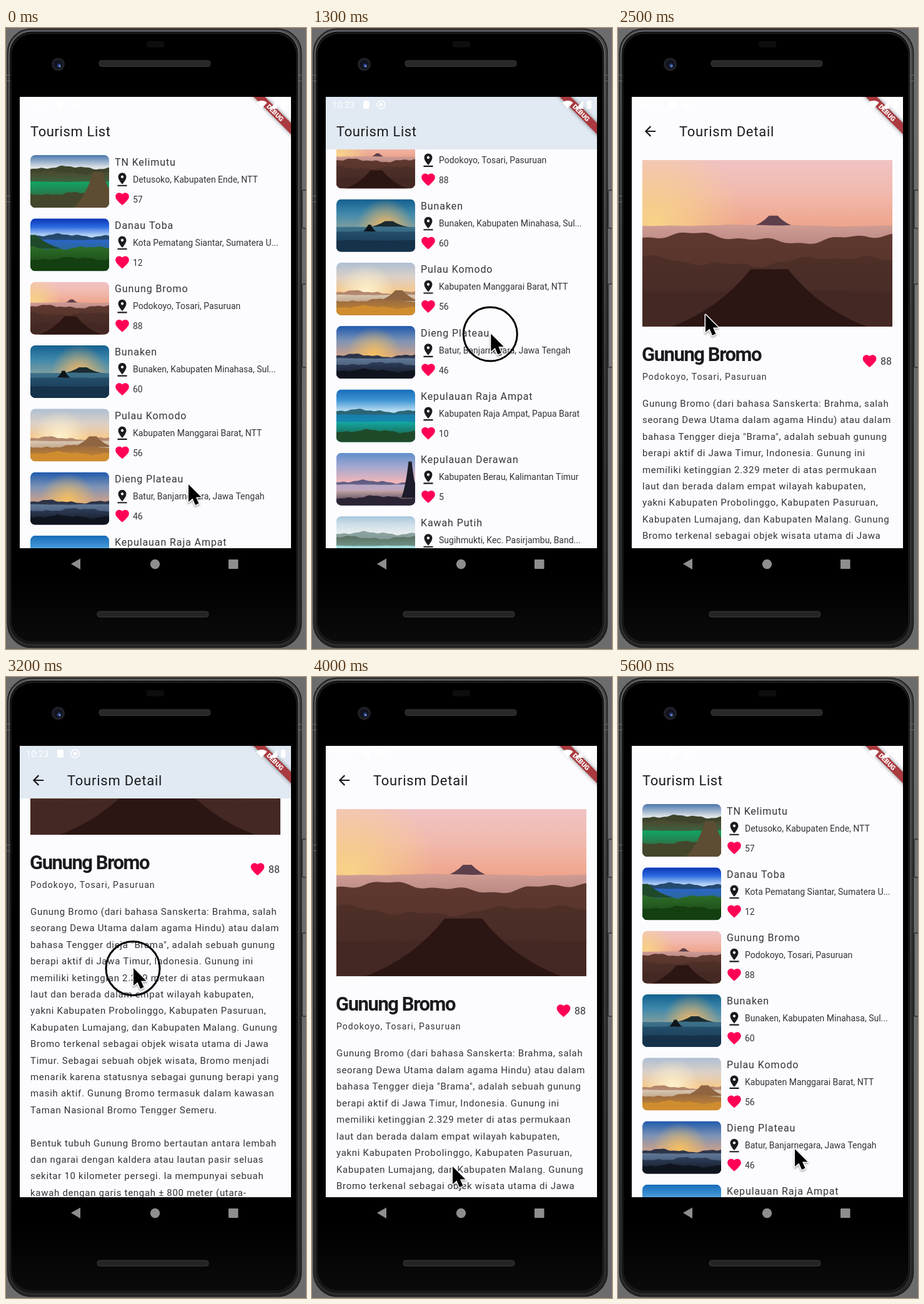
These frames come from a looping animation (480 by 992 pixels, 5.7 s). An HTML page with a canvas:

```html
<!DOCTYPE html>
<html lang="id">
<head>
<meta charset="utf-8">
<title>Tourism List</title>
<style>
html, body { margin: 0; width: 100%; height: 100%; overflow: hidden; background: #6c6c6c; }
canvas { display: block; }
</style>
</head>
<body>
<canvas id="stage" width="480" height="992"></canvas>
<script>
const g = document.getElementById('stage').getContext('2d');
const LOOP = 5700, STEP = 100;
const INK = '#1b1b1f', SOFT = '#333438', PAPER = '#fcfcff', PINK = '#ff0055', TINT = '#e1e9f2';
const SCREEN = [22, 110, 434, 721], HEADER_END = 194, CARD = 101.3, LINE = 26.4;

const HEART = new Path2D('M12 21.35l-1.45-1.32C5.4 15.36 2 12.28 2 8.5 2 5.42 4.42 3 7.5 3c1.74 0 3.41.81 4.5 2.09C13.09 3.81 14.76 3 16.5 3 19.58 3 22 5.42 22 8.5c0 3.78-3.4 6.86-8.55 11.54z');
const PIN = new Path2D('M18 8c0-3.31-2.69-6-6-6S6 4.69 6 8c0 4.5 6 11 6 11s6-6.5 6-11zm-8 0c0-1.1.9-2 2-2s2 .9 2 2-.89 2-2 2c-1.1 0-2-.9-2-2zM5 20v2h14v-2z');
const BACK = new Path2D('M20 11H7.83l5.59-5.59L12 4l-8 8 8 8 1.41-1.41L7.83 13H20z');
const ARROW = new Path2D('M0 0V28L6.5 22.5 11 33 16.5 30.5 12 20.5H20.5Z');

// Land layers run from far to near; "=" marks flat water, sand or cloud.
const places = [
  { name: 'TN Kelimutu', spot: 'Detusoko, Kabupaten Ende, NTT', likes: 57,
    horizon: 20, sky: '#4a76aa #dfe4e8', land: '#3c442b #4b4a30 =#12a566 #43462a',
    peaks: [{ layer: 4, x: 108, half: 40, height: 58, color: '#5d4d33' }] },
  { name: 'Danau Toba', spot: 'Kota Pematang Siantar, Sumatera U...', likes: 12,
    horizon: 27, sky: '#0a35b4 #2c6be0 #b5d3f5', land: '#24486a =#2a66c8 #2c6a28 #143f10',
    peaks: [{ layer: 2, x: 0, half: 50, height: 22, color: '#1f4a2a' }] },
  { name: 'Gunung Bromo', spot: 'Podokoyo, Tosari, Pasuruan', likes: 88,
    horizon: 33, sky: '#f0c3c3 #f1b9ae #efa58c', sun: { x: 6, color: '#f8d488' }, land: '=#cf9c94 #5e382f #4d2f28 =#442823',
    peaks: [{ layer: 0, x: 66, half: 12, height: 6, color: '#5d3f4b' }, { layer: 4, x: 64, half: 52, height: 30, color: '#2c1613' }] },
  { name: 'Bunaken', spot: 'Bunaken, Kabupaten Minahasa, Sul...', likes: 60,
    horizon: 44, sky: '#14608f #3d87ab #7b9da0', sun: { x: 78, color: '#f2b865' }, land: '=#3d718a =#244f6c =#15324a',
    peaks: [{ layer: 0, x: 84, half: 34, height: 10, color: '#1a2b30' }, { layer: 1, x: 53, half: 12, height: 12, color: '#0d141a' }] },
  { name: 'Pulau Komodo', spot: 'Kabupaten Manggarai Barat, NTT', likes: 56,
    horizon: 47, sky: '#aebfd3 #dcd0c6 #f6c98c', sun: { x: 48, color: '#fff3cf' }, land: '#b0846a =#d8c7b3 #9a6b40 #cf8d30',
    peaks: [{ layer: 2, x: 100, half: 32, height: 17, color: '#8e6540' }] },
  { name: 'Dieng Plateau', spot: 'Batur, Banjarnegara, Jawa Tengah', likes: 46,
    horizon: 47, sky: '#1f59ad #7d93b5 #c9a08d', sun: { x: 60, color: '#f6c060' }, land: '#2a3146 =#5f7795 #2c3b56 #10141e' },
  { name: 'Kepulauan Raja Ampat', spot: 'Kabupaten Raja Ampat, Papua Barat', likes: 10,
    horizon: 34, sky: '#166bb8 #3f94d4 #b6dcf0', land: '#2c6474 =#187eae =#12a9a4 #1f4a2a' },
  { name: 'Kepulauan Derawan', spot: 'Kabupaten Berau, Kalimantan Timur', likes: 5,
    horizon: 46, sky: '#5f8ecb #a6a8d0 #efb5b8', land: '#5c5a80 =#b9a7c5 =#c8a8ac #2b2536',
    peaks: [{ layer: 3, x: 118, half: 14, height: 58, color: '#1d1c2a' }] },
  { name: 'Kawah Putih', spot: 'Sugihmukti, Kec. Pasirjambu, Band...', likes: 94,
    horizon: 27, sky: '#a6c6de #cfdfe8 #e7edee', land: '#8ba2a0 #5d7566 =#a5dedb =#a0dad6' },
  { name: 'Pantai Tanjung Tinggi', spot: 'Kecamatan Sijuk, Kabupaten Belitu...', likes: 78,
    horizon: 35, sky: '#2f7fd0 #66aee6 #d3e9f6', land: '#2d6a84 =#1f7c9c =#54b0b0 =#a9c8b8',
    peaks: [{ layer: 2, x: 106, half: 30, height: 22, color: '#6b757d' }] },
  { name: '', spot: '', likes: '', horizon: 34, sky: '#272b30 #45535a', land: '#5d7276' }
];

const story = `Gunung Bromo (dari bahasa Sanskerta: Brahma, salah
seorang Dewa Utama dalam agama Hindu) atau dalam
bahasa Tengger dieja "Brama", adalah sebuah gunung
berapi aktif di Jawa Timur, Indonesia. Gunung ini
memiliki ketinggian 2.329 meter di atas permukaan
laut dan berada dalam empat wilayah kabupaten,
yakni Kabupaten Probolinggo, Kabupaten Pasuruan,
Kabupaten Lumajang, dan Kabupaten Malang. Gunung
Bromo terkenal sebagai objek wisata utama di Jawa
Timur. Sebagai sebuah objek wisata, Bromo menjadi
menarik karena statusnya sebagai gunung berapi yang
masih aktif. Gunung Bromo termasuk dalam kawasan
Taman Nasional Bromo Tengger Semeru.

Bentuk tubuh Gunung Bromo bertautan antara lembah
dan ngarai dengan kaldera atau lautan pasir seluas
sekitar 10 kilometer persegi. Ia mempunyai sebuah
kawah dengan garis tengah ± 800 meter (utara-
selatan) dan ± 600 meter (timur-barat).`.split('\n');

const listDrag = { start: 200, release: 1680, grab: 722 };
const detailDrag = { start: 2800, release: 3800, grab: 690 };
const taps = [{ start: 2100, release: 2200 }, { start: 4900, release: 5000 }];

// Pointer tip: time, x, y.
const trail = [[0, 292, 729], [200, 292, 722], [900, 279, 336], [1050, 279, 326], [1680, 300, 794], [1800, 300, 794],
  [2100, 140, 458], [2500, 140, 458], [2800, 195, 690], [3200, 204, 465], [3300, 206, 450], [3800, 225, 782],
  [4100, 225, 782], [4800, 52, 166], [5000, 52, 166], [5400, 283, 754], [5600, 283, 754], [LOOP, 292, 729]];

const clamp = v => Math.max(0, Math.min(1, v));
const smooth = v => v * v * (3 - 2 * v);
const mix = (a, b, p) => a + (b - a) * p;

function pointer(t) {
  const i = trail.findIndex((k, n) => n && t <= k[0]);
  const [a, b] = [trail[i - 1], trail[i]];
  const p = smooth((t - a[0]) / (b[0] - a[0]));
  return [mix(a[1], b[1], p), mix(a[2], b[2], p)];
}

// A drag scrolls the page; pulling past the top stretches it until it settles.
function pull(t, { start, release, grab }) {
  if (t < start || t > release + 400) return [0, 1];
  const d = grab - pointer(Math.min(t, release))[1];
  const relax = Math.exp(-Math.max(0, t - release) / 80);
  return [Math.max(0, d), 1 + Math.max(0, -d) * .0004 * relax];
}

function text(s, x, y, size, gap = 0, color = INK, weight = 400) {
  g.font = `${weight} ${size}px Roboto, "Open Sans", sans-serif`;
  g.letterSpacing = gap + 'px';
  g.fillStyle = color;
  g.fillText(s, x, y);
}

// Icons live on a 24 x 24 grid and are placed by its centre.
function icon(path, x, y, color = INK) {
  g.save();
  g.translate(x, y);
  g.scale(1.08, 1.08);
  g.translate(-12, -12);
  g.fillStyle = color;
  g.fill(path, 'evenodd');
  g.restore();
}

function box(x, y, w, h, r, fill, line) {
  g.beginPath();
  g.roundRect(x, y, w, h, r);
  g.fillStyle = fill;
  g.fill();
  if (line) { g.strokeStyle = line; g.stroke(); }
}

function disc(x, y, r, fill) {
  g.beginPath();
  g.arc(x, y, r, 0, 7);
  g.fillStyle = fill;
  g.fill();
}

function poly(pts, fill) {
  g.beginPath();
  for (let i = 0; i < pts.length; i += 2) g.lineTo(pts[i], pts[i + 1]);
  g.fillStyle = fill;
  g.fill();
}

function stops(fade, colors) {
  colors.forEach((c, i) => fade.addColorStop(i / Math.max(1, colors.length - 1), c));
  return fade;
}

const upright = (top, end, colors) => stops(g.createLinearGradient(0, top, 0, end), colors);

function ridge(top, rough, phase, fill) {
  g.beginPath();
  g.moveTo(0, 84);
  for (let x = 0; x <= 126; x += 2) {
    const wave = Math.sin(x * .06 + phase) + Math.sin(x * .17 + phase * 2) / 2 + Math.sin(x * .41 + phase * 3) / 4;
    g.lineTo(x, top + rough * wave);
  }
  g.lineTo(126, 84);
  g.fillStyle = fill;
  g.fill();
}

function peak({ x, half, height, color }, base) {
  const top = base - height, low = base - height * .3, rim = half * .18;
  g.beginPath();
  g.moveTo(x - half, base);
  g.quadraticCurveTo(x - half * .5, low, x - rim, top);
  g.lineTo(x + rim, top);
  g.quadraticCurveTo(x + half * .5, low, x + half, base);
  g.fillStyle = color;
  g.fill();
}

// A soft landscape on a 126 x 84 field; layers spread out as they come nearer.
function photo(place, x, y, w, h, radius) {
  const { horizon, sky, sun, land, peaks = [] } = place;
  const layers = land.split(' '), colors = layers.map(c => c.replace('=', '')), n = layers.length;
  const topOf = i => mix(horizon, 84, (i / n) ** 1.5);
  g.save();
  g.beginPath();
  g.roundRect(x, y, w, h, radius);
  g.clip();
  g.translate(x, y);
  g.scale(w / 126, h / 84);
  g.fillStyle = upright(0, horizon, sky.split(' '));
  g.fillRect(0, 0, 126, 84);
  if (sun) {
    g.fillStyle = stops(g.createRadialGradient(sun.x, horizon, 0, sun.x, horizon, 45), [sun.color, sun.color + '00']);
    g.fillRect(0, 0, 126, 84);
  }
  for (let i = 0; i <= n; i++) {
    peaks.filter(p => p.layer === i).forEach(p => peak(p, topOf(i) + 1));
    if (i < n) {
      const fill = upright(topOf(i), 84, [colors[i], colors[Math.min(i + 1, n - 1)]]);
      ridge(topOf(i), layers[i][0] === '=' ? .3 : 2, horizon + i * 1.7, fill);
    }
  }
  g.restore();
}

function page([scroll, stretch], header, body) {
  g.fillStyle = PAPER;
  g.fillRect(...SCREEN);
  g.save();
  g.beginPath();
  g.rect(22, HEADER_END, 434, 831 - HEADER_END);
  g.clip();
  g.translate(0, HEADER_END);
  g.scale(1, stretch);
  g.translate(0, -HEADER_END - scroll);
  body();
  g.restore();
  if (scroll > 0) {
    g.fillStyle = TINT;
    g.fillRect(22, 110, 434, HEADER_END - 110);
  }
  header();
}

function listPage(t) {
  page(pull(t, listDrag), () => text('Tourism List', 39, 173, 22, .6), () => places.forEach((place, i) => {
    const y = 203 + i * CARD;
    photo(place, 39, y, 126, 84, 8);
    text(place.name, 174, y + 16.5, 16, .9, SOFT);
    icon(PIN, 186, y + 39);
    text(place.spot, 203, y + 43.5, 14, 0, SOFT);
    icon(HEART, 186, y + 70, PINK);
    text(place.likes, 203, y + 75.5, 14, 0, SOFT);
  }));
}

function detailPage(t) {
  const place = places[2];
  page(pull(t, detailDrag), () => {
    icon(BACK, 51.5, 165);
    text('Tourism Detail', 98, 173, 22, .75);
  }, () => {
    photo(place, 39, 211, 400, 266, 0);
    text(place.name, 38, 532, 31, -1.45, INK, 700);
    text(place.spot, 39, 562, 14, 1.05, SOFT);
    icon(HEART, 402.5, 532, PINK);
    text(place.likes, 420, 538, 16, 0, SOFT);
    story.forEach((s, i) => text(s, 39, 605 + i * LINE, 15, .7, SOFT));
  });
}

function overlays() {
  g.save();
  g.translate(456, 110);
  g.rotate(Math.PI / 4);
  g.shadowColor = 'rgba(0,0,0,.5)';
  g.shadowBlur = 6;
  g.fillStyle = '#aa3a3f';
  g.fillRect(-60, 29.6, 120, 12.6);
  g.shadowColor = 'transparent';
  g.textAlign = 'center';
  text('DEBUG', 0, 39.6, 10.5, 0, '#fff', 900);
  g.restore();
  text('10:23', 32, 127.5, 14, .3, '#fff');
  box(82, 116, 10, 13, 2, '#fff');
  g.lineWidth = 1.5;
  g.strokeStyle = '#fff';
  g.beginPath();
  g.arc(110.5, 122.5, 6.5, 0, 7);
  g.stroke();
  disc(110.5, 122.5, 3, '#fff');
  g.beginPath();
  g.moveTo(409, 129);
  g.arc(409, 129, 13, -2.3, -.84);
  g.fillStyle = '#fff';
  g.fill();
  poly([422, 129, 434, 116, 434, 129], '#fff');
  box(440, 116, 7, 13, 1, '#fff');
}

function phone() {
  g.fillStyle = '#6c6c6c';
  g.fillRect(0, 0, 480, 992);
  g.lineWidth = 1.5;
  box(474, 259, 8, 61, 2, '#777', '#303030');
  box(474, 409, 8, 133, 2, '#777', '#303030');
  box(2.5, 1.5, 470, 988, 38, upright(0, 992, ['#4a4a4a', '#303030', '#262626']), '#191919');
  g.lineWidth = 1;
  box(5, 5, 463, 980, 36, '#151515', upright(0, 992, ['#8a8a8a', '#555', '#3a3a3a']));
  box(8, 9, 457, 972, 34, upright(880, 981, ['#000', '#0b0b0b']), '#222');
  g.fillStyle = '#6b6b6b';
  for (const y of [75, 84]) {
    g.fillRect(1, y, 6, 1);
    g.fillRect(467, y, 6, 1);
    g.fillRect(1, y + 193, 6, 1);
  }
  box(225, 21, 28, 10, 3, '#0d0d0d');
  box(149, 52, 178, 9.5, 4, '#282828', '#3a3a3a');
  box(146, 932, 178, 9, 4, '#242424', '#3a3a3a');
  disc(83.5, 58, 10.5, '#202127');
  disc(83.5, 58, 7, '#11131f');
  disc(85, 60, 3, '#2c4383');
  disc(86, 61, 1.2, '#9db7ef');
  poly([104, 856, 119, 847.5, 119, 865], '#8e8e8e');
  disc(238.5, 856.5, 7.7, '#8e8e8e');
  box(356, 849, 15.5, 15, 1, '#8e8e8e');
}

function cursor(t) {
  const [x, y] = pointer(t);
  if ([listDrag, detailDrag, ...taps].some(p => t >= p.start && t <= p.release)) {
    g.beginPath();
    g.arc(x - 1, y + .5, 43, 0, 7);
    g.lineWidth = 3;
    g.strokeStyle = '#000';
    g.stroke();
  }
  g.save();
  g.translate(x, y);
  g.shadowColor = 'rgba(0,0,0,.35)';
  g.shadowBlur = 3;
  g.shadowOffsetY = 2;
  g.lineWidth = 3;
  g.lineJoin = 'round';
  g.strokeStyle = '#fff';
  g.stroke(ARROW);
  g.shadowColor = 'transparent';
  g.fillStyle = '#000';
  g.fill(ARROW);
  g.restore();
}

function draw(t) {
  phone();
  g.save();
  g.beginPath();
  g.rect(...SCREEN);
  g.clip();
  const open = clamp((t - 2150) / 300) - clamp((t - 4950) / 300);
  if (open < 1) listPage(t);
  if (open > 0) {
    const zoom = mix(.85, 1, smooth(open));
    g.save();
    g.globalAlpha = clamp(open * 2);
    g.translate(239, 470);
    g.scale(zoom, zoom);
    g.translate(-239, -470);
    detailPage(t);
    g.restore();
  }
  overlays();
  g.restore();
  cursor(t);
}

function tick() {
  draw(Math.floor(performance.now() % LOOP / STEP) * STEP);
  requestAnimationFrame(tick);
}
tick();
</script>
</body>
</html>
```
